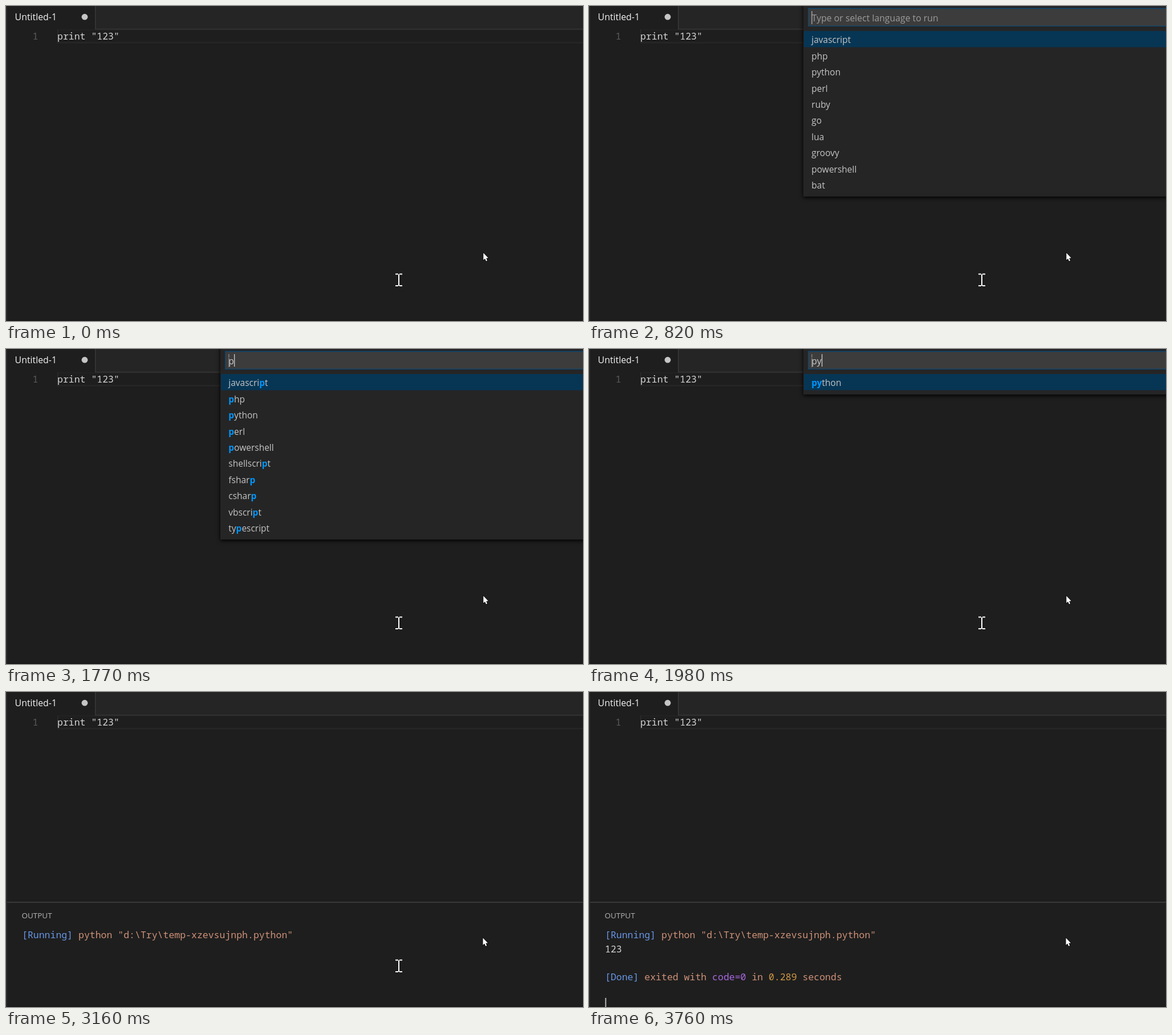
Animation, 1012 px wide and 554 px high, one loop 3910 ms. Source, as an HTML page with a canvas:

```html
<!DOCTYPE html>
<html lang="en">
<head>
<meta charset="utf-8">
<title>Run code by language</title>
<style>
  html, body { margin: 0; width: 100%; height: 100%; overflow: hidden; background: #1e1e1e; }
  canvas { display: block; width: 1012px; height: 554px; }
</style>
</head>
<body>
<canvas id="stage" width="1012" height="554"></canvas>
<script>
const ctx = document.getElementById('stage').getContext('2d');
const W = 1012, H = 554, LOOP = 3910;
const TIMES = { open: 820, blink: 1280, typeP: 1770, typeY: 1980, close: 2920, run: 3160, done: 3230, hideBeam: 3760 };

const UI = '"Open Sans", "Noto Sans", sans-serif';
const MONO = '16.5px "Noto Sans Mono", "DejaVu Sans Mono", monospace';
const LIST_SIZE = 15.5, ROW = 28.4, LINE = 24.5;
const BLUE = '#6796e6', ORANGE = '#ce9178', TEXT = '#d4d4d4';

const ALL = ['javascript', 'php', 'python', 'perl', 'ruby', 'go', 'lua', 'groovy', 'powershell', 'bat'];
const WITH_P = ['javascript', 'php', 'python', 'perl', 'powershell', 'shellscript', 'fsharp', 'csharp', 'vbscript', 'typescript'];

function rect(x, y, w, h, color) {
  ctx.fillStyle = color;
  ctx.fillRect(x, y, w, h);
}

// Draws text and returns the x where it ends.
function text(str, x, y, font, color) {
  ctx.font = font;
  ctx.fillStyle = color;
  ctx.fillText(str, x, y);
  return x + ctx.measureText(str).width;
}

function runs(parts, x, y, font) {
  for (const [str, color] of parts) x = text(str, x, y, font, color);
}

function polygon(points, fill, stroke) {
  ctx.beginPath();
  points.forEach(([x, y]) => ctx.lineTo(x, y));
  ctx.closePath();
  if (stroke) {
    ctx.strokeStyle = stroke;
    ctx.lineWidth = 1.5;
    ctx.stroke();
  }
  ctx.fillStyle = fill;
  ctx.fill();
}

function drawEditor(caret) {
  rect(0, 0, W, H, '#1e1e1e');
  rect(157, 0, W - 157, 40, '#252526');
  rect(156, 0, 1.5, 41, '#383838');
  rect(156, 40, W - 156, 1.5, '#383838');
  rect(90, 41.5, W - 90, 1, '#262626');
  rect(90, 63.5, W - 90, 2, '#282828');
  rect(90, 41, 1.5, 24, '#2c2c2c');
  rect(0, 0, 2, H, '#2b2b2c');
  rect(2, 552, W - 2, 2, '#191919');

  text('Untitled-1', 15.6, 25, '15.9px ' + UI, '#f4f4f4');
  ctx.beginPath();
  ctx.arc(138, 19.2, 5.4, 0, Math.PI * 2);
  ctx.fillStyle = '#c5c5c5';
  ctx.fill();
  text('1', 46.5, 59, MONO, '#5a5a5a');
  text('print "123"', 90, 59, MONO, TEXT);
  if (caret) rect(200, 41, 2, 24, '#b5b5b5');
}

function drawRow(name, query, y) {
  const at = query ? name.indexOf(query) : 0;
  const end = at + query.length;
  const plain = LIST_SIZE + 'px ' + UI;
  let x = text(name.slice(0, at), 390.3, y, plain, '#c5c5c5');
  if (query) x = text(query, x, y, 'bold ' + plain, '#0097fb');
  text(name.slice(end), x, y, plain, '#c5c5c5');
}

function drawPicker(names, query, gap) {
  const bottom = names.length > 1 ? 335 : 80;
  ctx.save();
  ctx.shadowColor = '#000';
  ctx.shadowBlur = 7;
  ctx.shadowOffsetY = 2;
  rect(376, -10, W - 366, bottom + 10, '#252526');
  ctx.restore();

  rect(384, 3.5, W - 384, 32.5, '#0d4670');
  rect(385.3, 5, W - 385, 29.7, '#3c3c3c');
  const inputFont = '15.8px ' + UI;
  if (query) {
    const end = text(query, 390.3, 26.5, inputFont, '#cccccc');
    rect(Math.round(end), 9, 1.3, 22, '#cccccc');
  } else {
    text('Type or select language to run', 390.8, 26.5, inputFont, '#9b9b9b');
  }
  rect(390.3, 9, 1.2, 23, query ? '#8d8d8d' : '#b8b8b8');
  if (gap) rect(390, 15, 2, 1, '#3c3c3c');

  rect(377, 44, W - 377, 28.4, '#073655');
  names.forEach((name, i) => drawRow(name, query, 65.4 + i * ROW));
}

function drawOutput(done) {
  const y = 433;
  rect(2, 369, W - 2, 1.5, '#414141');
  text('OUTPUT', 27.4, 398.4, '13.5px ' + UI, '#b4b4b4');
  runs([['[Running]', BLUE], [' python "d:\\Try\\temp-xzevsujnph.python"', ORANGE]], 28, y, MONO);
  if (!done) return;
  text('123', 28, y + LINE, MONO, TEXT);
  runs([
    ['[Done]', BLUE], [' exited with ', ORANGE], ['code=0', '#a868e0'],
    [' in ', ORANGE], ['0.289', '#d19a45'], [' seconds', ORANGE]
  ], 28, y + 3 * LINE, MONO);
  rect(28.3, 538, 2, 16, '#b5b5b5');
}

function drawBeam() {
  rect(688, 472, 2, 20, '#ffffff');
  for (const y of [470.5, 491]) {
    rect(683, y, 5, 2, '#ffffff');
    rect(690, y, 5, 2, '#ffffff');
  }
}

function drawArrow(x, y) {
  const shape = [[0, 0], [0, 12.5], [2.8, 10], [4.7, 14.4], [6.8, 13.5], [4.9, 9.3], [8.6, 9]];
  polygon(shape.map(([dx, dy]) => [x + dx, y + dy]), '#ffffff', '#080808');
}

function draw(t) {
  const { open, blink, typeP, typeY, close, run, done, hideBeam } = TIMES;
  drawEditor(t >= close && t < run);
  if (t >= open && t < close) {
    if (t < typeP) drawPicker(ALL, '', t >= blink);
    else if (t < typeY) drawPicker(WITH_P, 'p', true);
    else drawPicker(['python'], 'py', true);
  }
  if (t >= run) drawOutput(t >= done);
  if (t < hideBeam) drawBeam();
  if (t < run) drawArrow(837.3, 434.3);
  else drawArrow(836.5, 432.5);
}

const start = performance.now();
function tick() {
  draw((performance.now() - start) % LOOP);
  requestAnimationFrame(tick);
}
tick();
</script>
</body>
</html>
```
